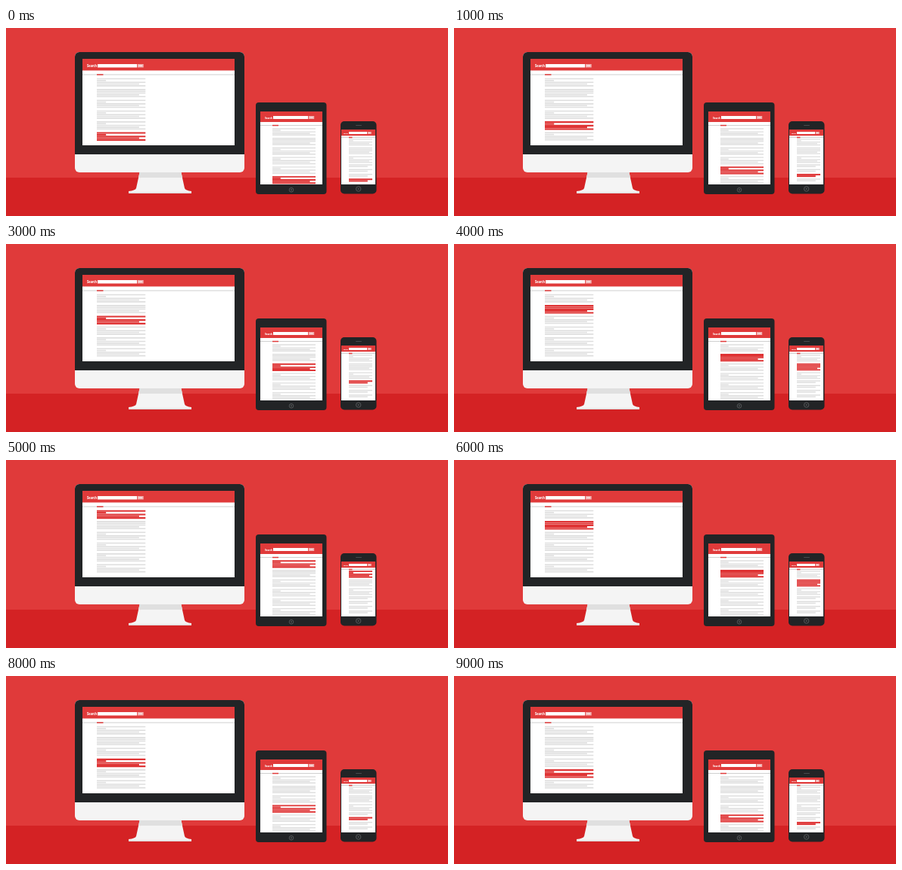
Write an HTML page with a canvas that moves like this. It is 584 px wide and 250 px high and loops after 10000 ms.

```html
<!DOCTYPE html>
<html lang="en">
<head>
<meta charset="utf-8">
<title>Responsive page highlight</title>
<style>
  html, body { margin: 0; width: 100%; height: 100%; overflow: hidden; }
  canvas { display: block; width: 584px; height: 250px; }
</style>
</head>
<body>
<canvas id="stage" width="584" height="250"></canvas>
<script>
const ctx = document.getElementById('stage').getContext('2d');
const RED = '#e03a3a', FLOOR = '#d42224', DARK = '#222426', GREY = '#dedede';

// Line widths of one paragraph, as fractions of the column.
const FULL_LINES = [1, 0.19, 1, 0.87, 1];
const WIDE_LINES = [1, 1, 1, 0.87, 1];
const SHORT_LINES = [1, 0.8];

const paragraphs = (start, pitch, height) =>
  Array.from({ length: 6 }, (_, i) => ({
    y: start + i * pitch,
    height,
    lines: i === 1 ? WIDE_LINES : FULL_LINES
  }));

const pages = [
  {
    screen: [101, 41, 201, 115], header: 15.5, rule: 61.5,
    column: [120, 64.3], tab: 8.5, logo: [107, 52.3, 4.6],
    search: [121, 48, 52, 4.5], button: 8,
    paragraphs: paragraphs(66.7, 14.35, 11.7)
  },
  {
    screen: [336, 111, 82, 97], header: 14, rule: 129,
    column: [352, 57], tab: 8, logo: [342, 120.7, 3.9],
    search: [353, 117, 46, 4], button: 7.5,
    paragraphs: paragraphs(133.3, 12.72, 10.4)
  },
  {
    screen: [443, 135, 45, 73], header: 8.3, rule: 145,
    column: [453, 31], tab: 4.5, logo: [446, 141, 2.5],
    search: [453, 138, 24, 3], button: 5,
    paragraphs: [
      { y: 147.2, height: 9.6, lines: FULL_LINES },
      { y: 158.8, height: 9.6, lines: WIDE_LINES },
      ...[181.3, 187.5, 193.9, 200.2].map(y =>
        ({ y, height: 4.4, lines: SHORT_LINES }))
    ],
    plain: { y: 170.6, height: 9.4, lines: FULL_LINES }
  }
];

function box(x, y, w, h, color, radius = 0) {
  ctx.fillStyle = color;
  ctx.beginPath();
  ctx.roundRect(x, y, w, h, radius);
  ctx.fill();
}

function shape(path, color) {
  ctx.fillStyle = color;
  ctx.fill(new Path2D(path));
}

function homeButton(x, y, radius) {
  ctx.strokeStyle = '#55585a';
  ctx.lineWidth = 1;
  ctx.beginPath();
  ctx.arc(x, y, radius, 0, 2 * Math.PI);
  ctx.stroke();
  box(x - 1, y - 1, 2, 2, '#484b4d');
}

function drawDevices() {
  box(0, 0, 584, 250, RED);
  box(0, 199, 584, 51, FLOOR);

  shape('M177 190H231L236 213Q237 216 245 217V220H162V217Q171 216 172 213Z', '#f4f4f4');
  shape('M176.5 192H231.5L233 199H175Z', '#e0e0e0');
  box(162, 218.5, 83, 1.5, '#e1dede');
  box(91, 32, 224, 160, '#f4f4f4', 6);
  box(91, 32, 224, 136, DARK, [6, 6, 0, 0]);

  box(330, 99, 93.5, 122, DARK, 4);
  homeButton(377, 215.3, 2.8);

  box(442, 124, 47.5, 96.5, DARK, 5);
  box(462, 129, 8, 1, '#484b4d', 0.5);
  homeButton(465.7, 214, 3.2);
}

function drawParagraph({ y, height, lines }, [x, width], active) {
  const step = height / lines.length;
  lines.forEach((part, i) =>
    box(x, y + i * step, width * part, step * (active ? 0.92 : 0.68), active ? '#df3435' : GREY));
}

function drawPage(page, active) {
  const [x, y, w, h] = page.screen;
  const [sx, sy, sw, sh] = page.search;
  const [lx, ly, size] = page.logo;
  box(x, y, w, h, '#fff');
  box(x, y, w, page.header, RED);
  ctx.fillStyle = '#fff';
  ctx.font = `900 ${size}px Lato, sans-serif`;
  ctx.fillText('Search', lx, ly, sx - lx - 1);
  box(sx, sy, sw, sh, '#fff');
  box(sx + sw + 0.7, sy, page.button, sh, '#f0b0b0');
  box(sx + sw + 2.4, sy + sh * 0.35, page.button - 3.4, sh * 0.3, '#fbe8e8');
  box(x, page.rule, w, 0.9, '#cfcfcf');
  box(page.column[0], page.rule - 0.2, page.tab, 1.5, RED);
  if (page.plain) drawParagraph(page.plain, page.column, false);
  page.paragraphs.forEach((p, i) => drawParagraph(p, page.column, i === active));
}

function draw(now) {
  const second = Math.floor(now / 1000) % 10;
  const active = Math.abs(5 - second);
  drawDevices();
  pages.forEach(page => drawPage(page, active));
  requestAnimationFrame(draw);
}

draw(performance.now());
</script>
</body>
</html>
```
